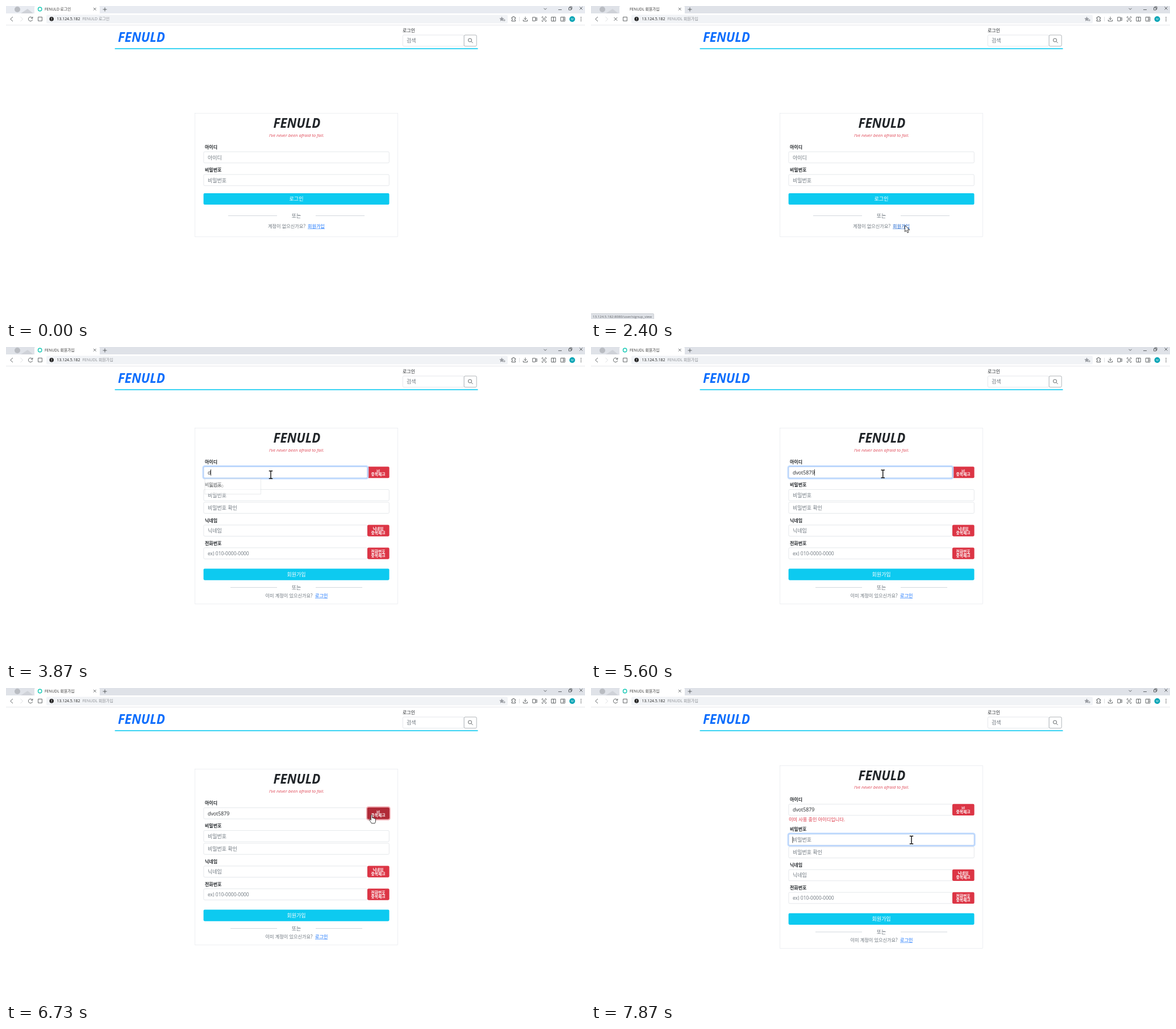
An HTML page that plays this animation: 1019x550 px, repeating every 8000 ms.

```html
<!DOCTYPE html>
<html lang="ko">
<head>
<meta charset="utf-8">
<title>FENULD</title>
<style>
html, body { margin: 0; width: 100%; height: 100%; overflow: hidden; background: #fff; }
svg { display: block; width: 100%; height: 100%; }
text { font-family: "Open Sans", "Noto Sans CJK KR", "Noto Sans CJK", sans-serif; white-space: pre; }
.logo { font: italic 600 22.3px "Noto Sans", sans-serif; }
.ico { fill: none; stroke: #3c4043; stroke-width: .8; }
</style>
</head>
<body>
<svg id="stage" viewBox="0 0 1019 550" xmlns="http://www.w3.org/2000/svg"></svg>
<script>
const GREY = '#6c757d', INK = '#212529', RED = '#dc3545', CYAN = '#0dcaf0', BLUE = '#0d6efd';
const HAIR = .53;

// --- markup helpers ---
const text = (x, y, s, size, fill = INK, more = '') =>
  `<text x="${x}" y="${y}" font-size="${size}" fill="${fill}" ${more}>${s}</text>`;
const mid = (x, y, s, size, fill, more = '') => text(x, y, s, size, fill, 'text-anchor="middle" ' + more);
const rect = (x, y, w, h, fill, more = '') =>
  `<rect x="${x}" y="${y}" width="${w}" height="${h}" fill="${fill}" ${more}/>`;
const path = (d, more = '') => `<path class="ico" d="${d}" ${more}/>`;
const group = (id, inner, more = '') => `<g id="${id}" ${more}>${inner}</g>`;
const box = (x, y, w, stroke = '#ced4da') =>
  rect(x, y, w, 19.64, '#fff', `rx="2" stroke="${stroke}" stroke-width="${HAIR}"`);
const label = (y, s) => text(350, y, s, 8, INK, 'font-weight="600"');
const field = (y, w, hint, id = '') =>
  box(347.9, y, w) + text(355, y + 13.4, hint, hint[0] === 'e' ? 8.5 : 9, GREY, id && `id="${id}"`);
const ring = (id, x, y, w, color, glow) => group(id,
  rect(x - 1.3, y - 1.3, w + 2.6, 22.24, 'none', `rx="3.2" stroke="${glow}" stroke-width="2.1"`) +
  rect(x, y, w, 19.64, 'none', `rx="2" stroke="${color}" stroke-width="${HAIR}"`), 'opacity="0"');
const checkText = (y, s) =>
  mid(655, y + 9.2, s, 6.8, '#fff', 'font-weight="600"') + mid(655, y + 15.8, '중복체크', 6.8, '#fff', 'font-weight="600"');
const check = (y, s, fill = RED) => rect(636, y - .27, 38.6, 20.17, fill, 'rx="2.1"') + checkText(y, s);
const submit = (y, s) => rect(347.6, y, 326.9, 20.17, CYAN, 'rx="2.1"') + mid(511, y + 13.4, s, 9, '#fff');
const either = (y, x1, x2) =>
  rect(x1, y, 477 - x1, .9, '#ced4da') + rect(545, y, x2 - 545, .9, '#ced4da') + mid(511, y + 3.8, '또는', 9, GREY);
const link = (x, y, w, s, id = '') =>
  group(id, text(x, y, s, 8.1, 'currentColor') + rect(x, y + 1, w, HAIR, 'currentColor'), `color="${BLUE}"`);
const heading = y => mid(512, y, 'FENULD', 22.3, INK, 'class="logo"') +
  mid(511.5, y + 15.4, 'I’ve never been afraid to fail.', 7.8, RED, 'font-style="italic" opacity=".9"');

// --- browser frame ---
function browser() {
  const tab = rect(0, 0, 1019, 13, '#e8ebf1', 'id="strip"') +
    '<path d="M26 13L38 5L48 13Z" fill="#cfd2d8"/><circle cx="20" cy="6" r="5" fill="#b9bcc2"/>' +
    rect(50, 0, 115, 14, '#fff', 'rx="2"') +
    '<circle id="favicon" cx="59.7" cy="5.5" r="3.2" fill="none" stroke="#12c8b4" stroke-width="1.4"/>' +
    text(68, 7.8, '', 6.8, '#333', 'id="title"') +
    path('M154 3l4.6 4.6M158.6 3l-4.6 4.6') + path('M170.5 6h7M174 2.5v7') +
    path('M946.5 3.8l2.5 2.5l2.5-2.5M972 6.5h6M1009.5 1.5l5 5M1014.5 1.5l-5 5') +
    path('M990.5 3h4v4h-4zM992 3v-1.5h4v4h-1.5');
  const bar = rect(0, 13, 1019, 20, '#fff') + rect(0, 33, 1019, 1, '#e6e7ea') +
    rect(71, 15.5, 812, 15, '#f1f3f6', 'rx="2.5"') +
    path('M12 19l-4.2 4l4.2 4') + path('M25.5 19l4.2 4l-4.2 4', 'style="stroke:#d3d5d9"') +
    group('reload', path('M46.4 21.2a3.7 3.7 0 1 0 .3 2.6M46.9 18.8v2.8h-2.8')) +
    group('stop', path('M40.5 20l5.8 5.8M46.3 20l-5.8 5.8')) +
    path('M56.6 19.4h6.8v6.8h-6.8z') +
    '<circle cx="80.2" cy="22.8" r="3.8" fill="#222"/>' + rect(79.8, 20.5, .9, 2.8, '#fff') + rect(79.8, 24, .9, .9, '#fff') +
    text(89.5, 25.4, '13.124.5.182', 6.9, '#222') + text(134.5, 25.4, '', 7, '#8a8d92', 'id="addr"') +
    '<path d="M872.5 18.5l1.3 2.8 3 .4-2.2 2 .6 3-2.7-1.500-2.700 1.500.6-3-2.200-2 3-.4z" fill="#9a9da3"/>' +
    path('M875 25h4M877 23v4', 'style="stroke:#8a8d92"') +
    path('M890 20h2a1.3 1.3 0 1 1 2.5 0h2v2.3a1.2 1.2 0 1 0 0 2.3v2h-6.5v-2a1.2 1.2 0 1 0 0-2.3z') +
    rect(903, 19, .8, 8, '#d5d7db') +
    path('M914 18.8v5M911.5 21.5l2.5 2.5l2.5-2.5M910.3 24v2.5h7.4v-2.5') +
    path('M926.8 19.8h5v6.4h-5zM931.8 22l2.5-1.5v5l-2.5-1.5') +
    path('M943.5 21v-2h2M948.5 19h2v2M950.5 25v2h-2M945.5 27h-2v-2') + '<circle class="ico" cx="947" cy="23" r="1.9"/>' +
    path('M959.8 19.5h7.4v7h-7.4zM963.5 19.5v7') +
    path('M976.3 19.5h7.4v7h-7.4zM980.8 19.5v7M980.8 23h3') +
    '<circle cx="996.5" cy="23" r="5" fill="#05a3b4"/>' + mid(996.5, 24.8, 'M', 5, '#fff') +
    [20, 23, 26].map(y => `<circle cx="1012" cy="${y}" r=".8" fill="#3c4043"/>`).join('');
  return tab + bar;
}

const siteTop = text(197, 63, 'FENULD', 22.3, BLUE, 'class="logo"') +
  rect(191.6, 74.2, 638.9, 1.6, CYAN) + text(698, 45.8, '로그인', 8) +
  box(698.3, 51, 107.8) + text(705, 64.2, '검색', 9, GREY) + box(806.2, 51, 22, GREY) +
  '<circle class="ico" cx="816.5" cy="60" r="3"/>' + path('M818.8 62.3l2.8 2.8');

const card = (id, y, h) => rect(332.4, y, 357.2, h, '#fff', `id="${id}" stroke="#dee2e6" stroke-width="${HAIR}"`);

const login = card('loginCard', 188.6, 217) + heading(214.3) +
  label(251, '아이디') + field(256.1, 326.4, '아이디') +
  label(291, '비밀번호') + field(296.1, 326.4, '비밀번호') +
  submit(328.9, '로그인') + either(368, 391, 631) +
  text(461, 390, '계정이 없으신가요?', 8.2, GREY) + link(531, 390, 30, '회원가입', 'joinLink');

const upper = heading(168.3) + label(205.2, '아이디') + field(210.4, 288, '아이디', 'idHint') +
  text(355, 223.6, '', 8.8, INK, 'id="typed"') + check(210.4, 'id') +
  group('dark', check(210.4, 'id', '#b02a37')) +
  ring('idRing', 347.9, 210.4, 288, '#86b7fe', '#c2dbfe') +
  ring('redRing', 636.3, 210.4, 38, '#a52834', 'rgba(225,83,97,.5)') +
  rect(360, 215, .8, 11, '#111', 'id="caret"');

const lower = label(245.2, '비밀번호') + field(250.4, 326.4, '비밀번호') +
  ring('pwRing', 347.9, 250.4, 326.4, '#86b7fe', '#c2dbfe') +
  rect(354.5, 255, .8, 11, '#111', 'id="pwCaret"') +
  field(272.7, 326.4, '비밀번호 확인') + label(307.7, '닉네임') + field(312.8, 288, '닉네임') + check(312.8, '닉네임') +
  label(347.6, '전화번호') + field(352.8, 288, 'ex) 010-0000-0000') + check(352.8, '전화번호') +
  submit(389.5, '회원가입') + either(422, 395, 627) +
  text(456.5, 440, '이미 계정이 있으신가요?', 8.2, GREY) + link(544, 440, 22, '로그인');

const signup = card('joinCard', 142.6, 308.8) + group('upper', upper) + group('lower', lower) +
  text(348, 233.5, '이미 사용 중인 아이디입니다.', 8.2, RED, 'id="taken"') +
  group('suggest', rect(350, 231.5, 98.5, 27, '#fff', 'stroke="#d5d8dc"') + text(357, 246.5, 'dvot00', 8, '#555'));

const pointers =
  group('arrow', '<path d="M0 0V11.2L2.6 8.8L4.5 13L6.5 12.1L4.6 8H8.2Z" fill="#fff" stroke="#111" stroke-width=".8"/>') +
  group('beam', '<path d="M-3.2-6.8H-.8L0-6L.8-6.8H3.2M0-6V6M-3.2 6.8H-.8L0 6L.8 6.8H3.2" fill="none" stroke="#111" stroke-width="1.4"/>') +
  group('hand', '<path d="M-1.2 .6Q0-.8 1.1 .6V5.2L2.6 4.9L3.1 5.8L4.7 5.7L5.2 6.6Q7 6.3 7 8V11Q6.8 13 5.6 14.8H-.2Q-1.5 12-4 9.3Q-4.4 7.6-2.7 7.9L-1.2 9.2Z" fill="#fff" stroke="#111" stroke-width=".8"/>');

const stage = document.getElementById('stage');
stage.innerHTML = rect(0, 0, 1019, 550, '#fff') + browser() + siteTop +
  group('login', login) + group('signup', signup) +
  group('status', rect(-1, 540.5, 111.5, 11, '#dee1e6', 'stroke="#c6c9ce" stroke-width=".8" rx="1.5"') +
    text(3, 547.8, '13.124.5.182:8080/user/signup_view', 6.15, '#5f6368')) + pointers;

const el = {};
stage.querySelectorAll('[id]').forEach(n => el[n.id] = n);

// --- timing ---
const LOOP = 8000, STEP = 200 / 3;
const ID = 'dvot5879';
const KEYS = [3667, 3933, 4133, 4400, 4667, 4867, 5200, 5400];
const ROUTE = [
  [933, 977, 438], [1200, 850, 422], [1467, 690, 407], [1733, 587, 399], [1933, 556, 388], [2067, 552.8, 386],
  [2400, 552.8, 386], [2600, 487, 285], [2800, 471, 240], [3000, 466, 227], [3133, 466, 224.5],
  [5333, 466, 224.5], [5600, 513.5, 223], [6200, 635, 220], [6333, 642, 221], [6467, 643.5, 223], [6867, 643.5, 223],
  [7133, 569, 263], [7400, 564, 267]];
const KINDS = [[0, ''], [933, 'arrow'], [1933, 'hand'], [2330, 'arrow'], [2600, 'beam'], [6333, 'hand'], [6930, 'arrow'], [7067, 'beam']];
const SUGGEST = [[3667, 0], [3867, .5], [3933, .75], [4133, 0]];

function along(points, t) {
  const i = points.findIndex(p => p[0] > t);
  if (i === 0) return points[0].slice(1);
  if (i < 0) return points[points.length - 1].slice(1);
  const a = points[i - 1], b = points[i], k = (t - a[0]) / (b[0] - a[0]);
  return a.slice(1).map((v, j) => v + (b[j + 1] - v) * k);
}
const fade = (t, start, ms = 133) => Math.max(0, Math.min(1, (t - start) / ms));
const show = (node, on) => node.style.display = on ? '' : 'none';
const alpha = (node, v) => node.setAttribute('opacity', v);
const move = (node, x, y) => node.setAttribute('transform', `translate(${x} ${y})`);

function draw(now) {
  // motion advances fifteen times a second
  const t = Math.floor((now + 5) / STEP) * STEP + 1;
  const joined = t >= 2466, loading = t >= 2266 && t < 2599, warned = t >= 6800;

  el.title.textContent = el.addr.textContent = t >= 2333 ? 'FENUDL 회원가입' : 'FENULD 로그인';
  el.strip.setAttribute('fill', t >= 2200 ? '#dfe2e8' : '#e8ebf1');
  show(el.favicon, !loading);
  show(el.stop, loading);
  show(el.reload, !loading);
  show(el.login, !joined);
  show(el.signup, joined);
  el.joinLink.setAttribute('color', t >= 1933 ? '#0a58ca' : BLUE);
  alpha(el.status, fade(t, 1933) * (1 - fade(t, 2667)));

  const count = KEYS.filter(k => t >= k).length;
  el.typed.textContent = ID.slice(0, count);
  show(el.idHint, !count);
  const last = count ? KEYS[count - 1] : 3266;
  show(el.caret, t >= 3266 && t < 6530 && (t - last) % 1000 < 520);
  if (joined) el.caret.setAttribute('x', 354.6 + (count ? el.typed.getComputedTextLength() : 0));
  alpha(el.suggest, along(SUGGEST, t)[0]);

  alpha(el.idRing, fade(t, 3200) * (1 - fade(t, 6530)));
  alpha(el.dark, fade(t, 6266) * (1 - fade(t, 7667)));
  alpha(el.redRing, fade(t, 6530) * (1 - fade(t, 7667)));
  alpha(el.pwRing, fade(t, 7600));
  show(el.pwCaret, t >= 7667);

  const gap = warned ? 6.3 : 0;
  move(el.upper, 0, -gap);
  move(el.lower, 0, gap);
  el.joinCard.setAttribute('y', 142.6 - gap);
  el.joinCard.setAttribute('height', 308.8 + 2 * gap);
  show(el.taken, warned);

  const kind = KINDS.filter(k => t >= k[0]).pop()[1];
  const [x, y] = along(ROUTE, t);
  for (const name of ['arrow', 'beam', 'hand']) {
    show(el[name], name === kind);
    move(el[name], x, y);
  }
}

const begin = performance.now();
function tick() {
  draw((performance.now() - begin) % LOOP);
  requestAnimationFrame(tick);
}
tick();
</script>
</body>
</html>
```
